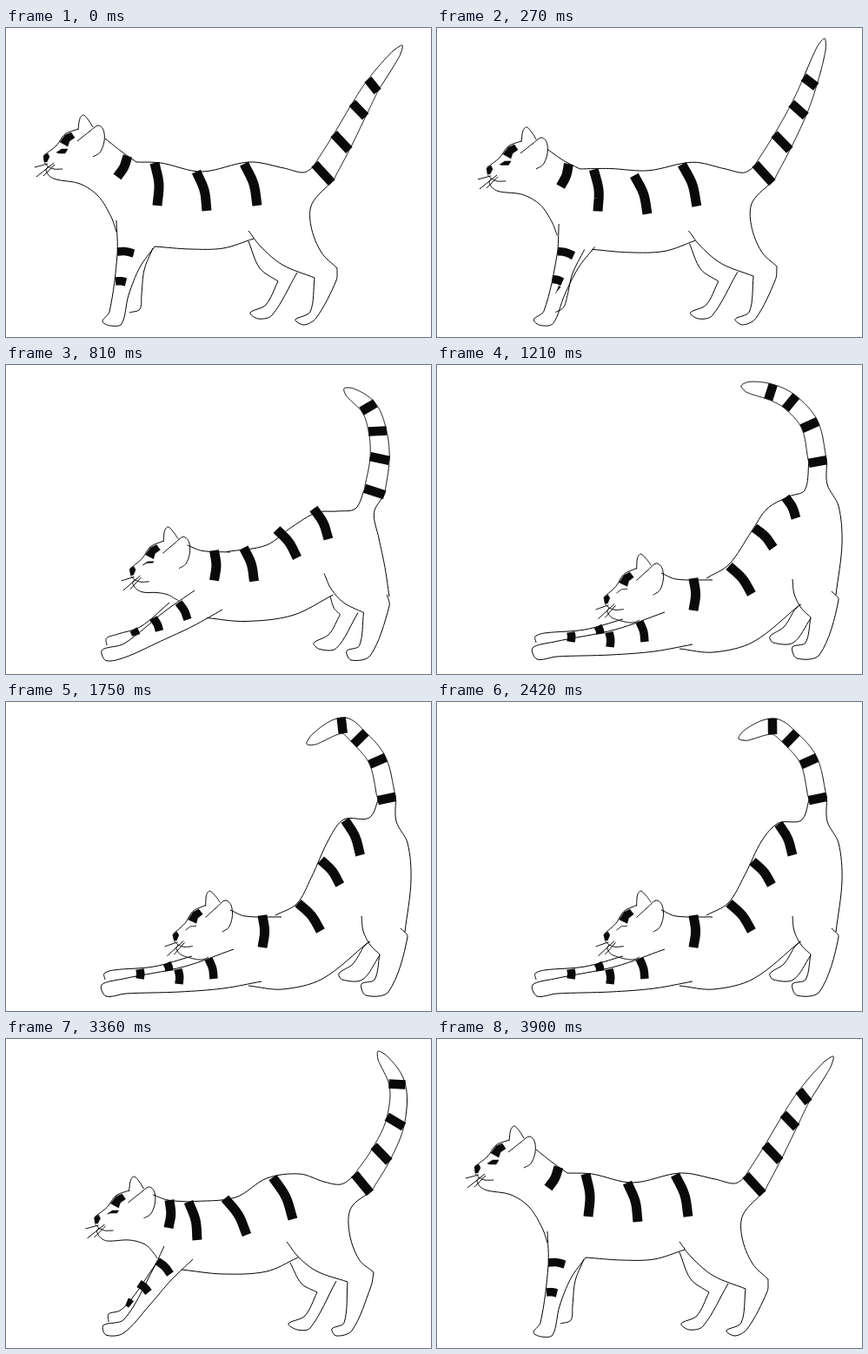
An HTML page for the animation above (5030 ms loop, 489 by 355 pixels).

```html
<!DOCTYPE html>
<html lang="en">
<head>
<meta charset="utf-8">
<title>Stretching cat</title>
<style>
  html, body { margin: 0; width: 100%; height: 100%; overflow: hidden; background: #fff; }
  svg { display: block; width: 489px; height: 355px; }
  path { fill: none; stroke: #000; stroke-width: 1; stroke-linejoin: round; }
  path.solid { fill: #0a0a0a; stroke-width: .5; }
  path.band { stroke: #0a0a0a; }
</style>
</head>
<body>
<svg id="stage" viewBox="0 0 489 355"></svg>
<script>
// One head for all poses, measured from the nose.
const head = {
  farEar: '37,-33 39,-46 43,-50 49,-44 54,-36',
  brow: '37,-34 22,-28 12,-15 -2,-4',
  nearEar: '36,-20 50,-31 60,-38 66,-33 67,-20 62,-7 54,-2',
  chin: '-2,5 2,9 0,13 4,20 12,24',
  mouth: '2,9 9,12 19,12',
  whiskers: '-13,10 2,6|-11,21 9,5|-3,20 10,7',
  nose: '-3,-3 2,-6 4,-2 1,4 -2,4',
  patch: '16,-19 22,-27 29,-30 33,-24 27,-20 25,-14'
};
const lid = '12,-7 18,-11 25,-11';

// face: nose x,y, tilt, eye opening. girth: tail half-width at base and tip, stripe slant.
// tail: centres of its four stripes, then the tip.
const stand = {
  face: '46,150 0 1',
  chest: '85,179 106,193 121,217 127,234',
  nape: '114,127 133,142 150,154',
  back: '150,154 178,155 225,165 280,154 320,161 342,166',
  tail: '365,167 386,131 406,94 422,66 456,20',
  girth: '14 7 .3',
  rump: '352,202 351,228 363,258 381,276',
  belly: '171,251 212,254 250,253 285,242',
  foreleg: '127,221 128,260 119,326 111,337 120,342 133,340 141,307 154,275 171,251',
  farForeleg: '169,253 159,278 156,306 154,323 142,327',
  hindFoot: '381,276 380,290 357,333 343,341 333,335 350,326 355,287',
  thigh: '355,287 318,272 293,251 279,233',
  farHind: '279,245 292,276 313,291|313,291 299,318 281,327 290,334 306,330 335,281',
  bands: '140,147 128,171|171,155 174,204|219,165 231,210|274,156 289,204',
  legBands: '128,257 147,259|126,291 138,292|138,300 138,300|132,291 132,291'
};
const reach = {
  face: '104.5,208 0 .6',
  chest: '142,231 160,236 170,246 174,252',
  nape: '169,179 186,185 210,187',
  back: '210,187 264,182 300,160 338,155 366,164 385,167',
  tail: '410,166 432,132 448,95 450,52 428,14',
  girth: '13.5 8 .3',
  rump: '397,194 395,222 406,253 423,268',
  belly: '202,265 250,270 300,267 336,251',
  foreleg: '182,238 170,263 136,322 112,329 115,340 135,338 165,306 190,277 215,253',
  farForeleg: '172,259 145,298 131,312 118,316 118,325',
  hindFoot: '423,268 420,284 398,335 380,341 375,333 389,326 393,279',
  thigh: '393,279 358,267 337,251 323,233',
  farHind: '327,257 340,281 358,291|358,291 344,318 325,327 335,334 350,332 380,278',
  bands: '188,185 187,217|210,187 220,231|252,183 277,225|307,159 330,207',
  legBands: '174,255 189,270|153,281 164,291|139,302 144,305|157,285 157,285'
};
const bow = {
  face: '195,270 4 0',
  chest: '216,295 223,296 229,295 233,293',
  nape: '258,239 275,246 317,247',
  back: '310,245 336,229 362,191 380,165 405,151 423,144',
  tail: '438,111 429,69 407,43 384,31 350,24',
  girth: '10.5 9 0',
  rump: '449,137 462,162 466,205 459,264',
  belly: '279,326 318,330 364,318 418,275',
  foreleg: '262,284 205,304 135,318 110,325 115,338 138,335 200,333 250,329 294,321',
  farForeleg: '214,292 170,304 124,308 113,312 114,319',
  hindFoot: '454,260 462,270 440,333 414,337 409,324 424,319 430,290',
  thigh: '430,290 419,279 411,263 409,246',
  farHind: '419,275 415,278 411,282|411,282 399,301 383,312 387,319 410,319 430,291',
  bands: '295,245 295,282|336,231 362,263|365,187 387,210|401,152 413,176',
  legBands: '233,295 239,318|198,307 199,324|154,307 154,318|185,300 188,309'
};
const arch = {
  ...bow,
  back: '310,245 335,231 354,199 374,159 393,139 419,136',
  tail: '438,111 428,68 407,42 386,28 347,42',
  bands: '295,245 295,282|336,231 362,263|363,183 385,210|393,140 409,176'
};
const crouch = {
  ...bow,
  face: '186,267 4 0',
  chest: '206,292 213,292 219,291 223,289',
  nape: '248,235 266,242 306,243',
  back: '298,242 335,232 358,212 377,184 396,172 419,163',
  tail: '438,125 428,83 407,57 384,45 350,40',
  rump: '450,145 463,176 466,212 459,264',
  belly: '260,316 300,319 360,308 417,277',
  foreleg: '252,280 198,301 136,318 109,326 115,339 138,334 190,329 240,323 283,309',
  farForeleg: '204,287 165,303 124,307 113,312 114,319',
  bands: '291,241 292,278|337,233 351,266|371,195 393,218|401,171 412,193',
  legBands: '223,291 229,315|187,302 189,320|154,306 155,316|182,296 185,304'
};

// In-between poses; the tail swings up as the cat leans forward
const lean = { ...mix(stand, reach, .24), tail: '376,167 397,131 416,94 429,62 446,12' };
const step = mix(reach, crouch, .5);
const peak = mix(bow, arch, 1.35);

function mix(a, b, t) {
  const out = {};
  for (const k in a) {
    const to = b[k].match(/[\d.]+/g);
    let i = 0;
    out[k] = a[k].replace(/[\d.]+/g, n => (+n + (to[i++] - n) * t).toFixed(2));
  }
  return out;
}

const points = s => s.split(' ').map(p => p.split(',').map(Number));
const gap = (a, b) => Math.hypot(b[0] - a[0], b[1] - a[1]) || .01;

// Smooth curve through p, n samples per span, tangents scaled by chord length
function smooth(p, n = 8) {
  const slope = p.map((q, i) => {
    const a = p[i - 1] || q, b = p[i + 1] || q, len = gap(a, q) + gap(q, b);
    return [(b[0] - a[0]) / len, (b[1] - a[1]) / len];
  });
  const out = [p[0]];
  for (let i = 0; i + 1 < p.length; i++) {
    const len = gap(p[i], p[i + 1]);
    for (let j = 1; j <= n; j++) {
      const t = j / n, s = 1 - t;
      out.push([0, 1].map(c =>
        p[i][c] * s * s * (1 + 2 * t) + p[i + 1][c] * t * t * (1 + 2 * s) +
        len * t * s * (slope[i][c] * s - slope[i + 1][c] * t)));
    }
  }
  return out;
}

function place(p, [x, y], tilt) {
  const c = Math.cos(tilt), s = Math.sin(tilt);
  return p.map(([u, v]) => [x + u * c - v * s, y + u * s + v * c]);
}

function makeTail(pose) {
  const [base, tip, slant] = pose.girth.split(' ').map(Number);
  const n = 6, spine = smooth(points(pose.tail), n), end = spine.length - 1;
  const left = [], right = [], stripes = [];
  spine.forEach((q, i) => {
    const a = spine[Math.max(i - 1, 0)], b = spine[Math.min(i + 1, end)], u = i / end;
    const across = Math.atan2(b[0] - a[0], a[1] - b[1]);
    const half = (base + (tip - base) * u) * Math.sqrt(1 - u ** 10);
    left.push(...place([[-half, 0]], q, across));
    right.unshift(...place([[half, 0]], q, across));
    if (i % n === 0 && i < end) {
      const reach = half / Math.cos(slant);
      stripes.push(place([[-reach, 0], [reach, 0]], q, across + slant));
    }
  });
  return { edge: [...left, ...right.slice(1)], stripes };
}

const stage = document.getElementById('stage');
const add = (parent, tag) =>
  parent.appendChild(document.createElementNS('http://www.w3.org/2000/svg', tag));

function draw(pose) {
  const g = add(stage, 'g');
  const path = (p, kind = 'line', width) => {
    const el = add(g, 'path');
    el.setAttribute('class', kind);
    el.setAttribute('d', 'M' + p.join(' ') + (kind === 'solid' ? 'Z' : ''));
    if (width) el.style.strokeWidth = width;
  };
  const band = (s, width) => s.split('|').forEach(part => {
    const [a, b] = points(part), bend = .07;
    const mid = [(a[0] + b[0]) / 2 + (b[1] - a[1]) * bend, (a[1] + b[1]) / 2 - (b[0] - a[0]) * bend];
    path(smooth([a, mid, b]), 'band', width);
  });

  const [nose, tilt, open] = pose.face.split(' ');
  const onFace = p => place(p, points(nose)[0], -tilt * Math.PI / 180);
  for (const k in head) {
    for (const part of head[k].split('|')) {
      const p = onFace(points(part));
      if (k === 'nose' || k === 'patch') path(p, 'solid');
      else path(smooth(k === 'chin' ? [...p, ...points(pose.chest)] : p));
    }
  }
  const upper = points(lid);
  const lower = upper.map(([x, y], i) => [x - (i && 3 * open), y + (i && 5 * open)]);
  path(onFace([...upper, ...lower.reverse()]), 'solid');

  const tail = makeTail(pose);
  path(smooth([...points(pose.back), ...tail.edge, ...points(pose.rump)]));
  tail.stripes.forEach(p => path(p, 'band', 10.5));
  for (const k of ['nape', 'belly', 'foreleg', 'farForeleg', 'hindFoot', 'thigh', 'farHind'])
    pose[k].split('|').forEach(part => path(smooth(points(part))));
  band(pose.bands, 11);
  band(pose.legBands, 9.5);
  g.style.display = 'none';
  return g;
}

const loop = 5030;
const [S, L, R, T, C, B, A, P] = [stand, lean, reach, step, crouch, bow, arch, peak].map(draw);
const cues = [
  [0, S], [270, L], [540, R], [810, T], [940, C], [1210, B], [1480, A], [1750, P],
  [2420, A], [2690, B], [2960, C], [3230, T], [3360, R], [3630, L], [3900, S]
];

let shown = null;
const start = performance.now();
function tick(now) {
  const t = Math.max(0, now - start) % loop;
  const next = cues.filter(c => c[0] <= t).pop()[1];
  if (next !== shown) {
    if (shown) shown.style.display = 'none';
    next.style.display = '';
    shown = next;
  }
  requestAnimationFrame(tick);
}
tick(start);
</script>
</body>
</html>
```
